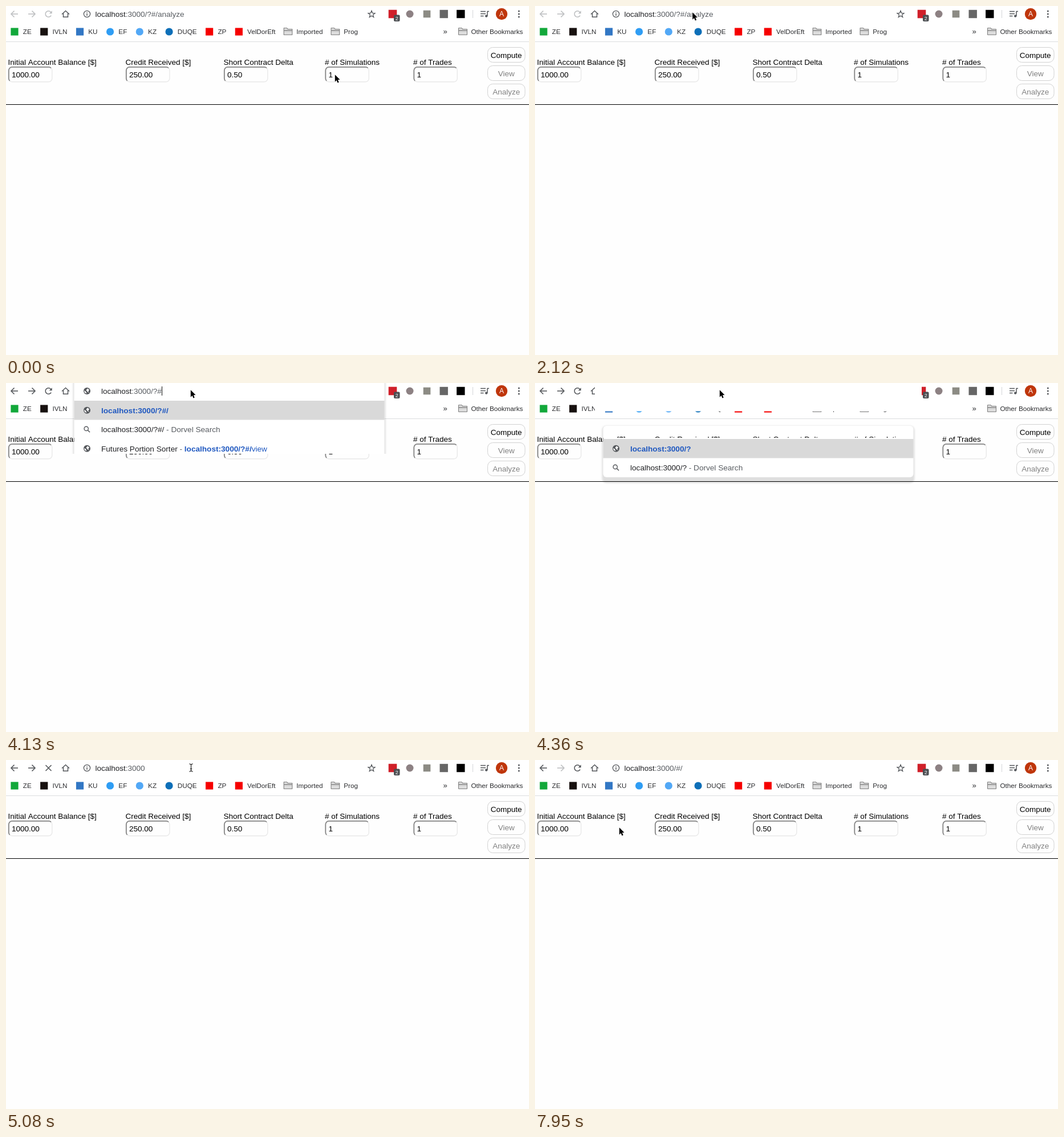
These frames come from a looping animation (917x611 px, 8 s). An HTML page with a canvas:

```html
<!DOCTYPE html>
<html lang="en">
<head>
<meta charset="utf-8">
<title>Position form</title>
<style>
html, body { margin: 0; width: 100%; height: 100%; overflow: hidden; background: #fefefe; }
canvas { display: block; }
</style>
</head>
<body>
<canvas id="stage" width="917" height="611"></canvas>
<script>
const ctx = document.getElementById('stage').getContext('2d');
const LOOP = 8000, STEP = 118;
const SANS = '"Liberation Sans", Arial, sans-serif';
const DARK = '#54575b', PALE = '#bdbfc1', INK = '#202124', GREY = '#595d62', BLUE = '#1f58c0';
const HOST = 'localhost:3000', PATH = '/?#/analyze';
const PAGES = ['/?#/view', PATH, '/#/view', '/#/', '/#/analyze', '/?#/'];
const ROW = 33.5, LEFT = 119.5, WIDTH = 544;

// Moments of the address bar session
const WAKE = 2350, SELECT = 2470, CARET = 2580, EDIT = 3060, SHRINK = 4130,
  SLIDE = 4360, SETTLE = 4470, ENTER = 4840, LOADED = 5200;

// Bursts of the delete key: start, presses, ms per press
const BURSTS = [[EDIT, 2, 115], [3540, 5, 90], [SHRINK, 4, 115]];

// Pointer strokes: start, end, from, bend, to
const STROKES = [
  [0, 830, [576, 119], [420, 296], [207, 113]],
  [830, 1310, [207, 113], [110, 10], [86, 10]],
  [1310, 1670, [86, 10], [150, 9], [254, 11]],
  [1670, SELECT, [254, 11], [270, 9], [323, 11]],
  [5080, 5560, [323, 11], [323, 200], [234, 343]],
  [5560, 5910, [234, 343], [236, 300], [240, 263]],
  [7590, 7950, [240, 263], [200, 170], [147, 117]]
];

const FIELDS = [
  [4, 'Initial Account Balance [$]', '1000.00'], [210, 'Credit Received [$]', '250.00'],
  [382, 'Short Contract Delta', '0.50'], [559.5, '# of Simulations', '1'], [714.5, '# of Trades', '1']
];

const BOOKMARKS = [
  ['ZE', square, '#12a83a'], ['IVLN', square, '#17110f'], ['KU', square, '#3277c4'],
  ['EF', disc, '#2f9df4'], ['KZ', disc, '#52a8f6'], ['DUQE', disc, '#0d6fb8'],
  ['ZP', square, '#f60000'], ['VelDorEft', square, '#f60000'],
  ['Imported', folder], ['Prog', folder]
];

function text(s, x, y, color = '#000', size = 13.5, weight = 400, align = 'left') {
  ctx.font = `${weight} ${size}px ${SANS}`;
  ctx.textAlign = align;
  ctx.fillStyle = color;
  ctx.fillText(s, x, y);
  return x + ctx.measureText(s).width;
}

function rect(x, y, w, h, color) {
  ctx.fillStyle = color;
  ctx.fillRect(x, y, w, h);
}

function square(x, y, r, color) {
  rect(x - r, y - r, 2 * r, 2 * r, color);
}

function disc(x, y, r, color) {
  ctx.beginPath();
  ctx.arc(x, y, r, 0, 7);
  ctx.fillStyle = color;
  ctx.fill();
}

function paint(fill, stroke, width) {
  if (stroke) {
    ctx.strokeStyle = stroke;
    ctx.lineWidth = width;
    ctx.stroke();
  }
  if (fill) {
    ctx.fillStyle = fill;
    ctx.fill();
  }
}

function trace(points, dx = 0, dy = 0) {
  ctx.beginPath();
  for (const [x, y] of points) ctx.lineTo(x + dx, y + dy);
}

function shape(points, dx, dy, fill, stroke, width) {
  trace(points, dx, dy);
  ctx.closePath();
  paint(fill, stroke, width);
}

function line(color, width, ...points) {
  trace(points);
  paint(null, color, width);
}

function box(x, y, w, h, r, fill, stroke, width) {
  ctx.beginPath();
  ctx.roundRect(x, y, w, h, r);
  paint(fill, stroke, width);
}

function ring(x, y, r, color, width, from = 0, to = 7) {
  ctx.beginPath();
  ctx.arc(x, y, r, from, to);
  paint(null, color, width);
}

function clipped(points, draw) {
  ctx.save();
  trace(points);
  ctx.clip();
  draw();
  ctx.restore();
}

const corners = (x, y, w, h) => [[x, y], [x + w, y], [x + w, y + h], [x, y + h]];

function arrow(x, dir, color) {
  line(color, 1.6, [x - 6 * dir, 14], [x + 6 * dir, 14]);
  line(color, 1.6, [x + .5 * dir, 8.5], [x + 6 * dir, 14], [x + .5 * dir, 19.5]);
}

function reload(color) {
  ring(74.5, 14, 5.3, color, 1.6, .5, 5.6);
  shape([[0, -5], [0, 0], [-5, 0]], 80.7, 13.2, color);
}

function globe(y) {
  disc(142, y, 6, DARK);
  shape([[-5, -1], [-2, 1], [-.5, 4.6], [-4, 3]], 142, y, '#fff');
  shape([[1, -4.5], [4, -2], [2, 1], [4, 3], [1.5, 2], [-1.5, -1.5]], 142, y, '#fff');
}

function lens(y) {
  ring(140.7, y - 1.3, 3.6, DARK, 1.4);
  line(DARK, 1.6, [143.3, y + 1.3], [147, y + 5]);
}

function folder(x, y) {
  const edge = '#5a5a5a';
  shape([[-7, -6], [-2, -6], [-.5, -4], [7, -4], [7, 5], [-7, 5]], x, y, '#dcdcdc', edge, 1.6);
  line(edge, 1, [x - 7, y - 2], [x + 7, y - 2]);
}

function star(x, y) {
  const tips = Array.from({ length: 10 }, (_, i) => {
    const a = (i / 5 - .5) * Math.PI, r = i % 2 ? 2.7 : 6.3;
    return [r * Math.cos(a), r * Math.sin(a)];
  });
  shape(tips, x, y, null, DARK, 1.3);
}

function toolbar(s) {
  arrow(15, -1, s.awake ? DARK : PALE);
  arrow(45, 1, s.awake && !s.loaded ? DARK : PALE);
  if (s.loading) for (const d of [-5, 5]) line(DARK, 1.6, [74.5 - d, 9], [74.5 + d, 19]);
  else reload(s.awake ? DARK : PALE);
  line(DARK, 1.5, [98, 14.5], [104.5, 8.5], [111, 14.5]);
  line(DARK, 1.5, [100.5, 13], [100.5, 19.3], [108.5, 19.3], [108.5, 13]);

  square(678, 14, 7.3, '#d0202a');
  box(680, 15.5, 10.5, 11.5, 2, '#4c4f53');
  text('2', 685.2, 24.7, '#fff', 9, 400, 'center');
  disc(708, 14, 6.5, '#8d8183');
  square(738, 14, 6.3, '#8c8b84');
  square(767.7, 14, 7.2, '#666');
  square(797.3, 14, 7.2, '#000');
  rect(818, 7, 1, 14, '#d5d6d8');
  for (const [i, w] of [9, 9, 5.5].entries()) rect(832, 8.8 + 4 * i, w, 1.5, DARK);
  line(DARK, 1.5, [844, 17.5], [844, 9.5], [847, 9.5]);
  disc(842.2, 17.6, 2.2, DARK);
  disc(869, 14, 10.2, '#bf360c');
  text('A', 869, 18.2, '#fff', 12, 400, 'center');
  for (const d of [-5, 0, 5]) disc(899.3, 14 + d, 1.5, DARK);
}

function bookmarks() {
  const ink = '#2a2b2e', size = 11.7;
  let x = 8;
  for (const [label, icon, color] of BOOKMARKS) {
    icon(x + 7, 45, 6.6, color);
    x = text(label, x + 21.8, 49, ink, size) + 15;
  }
  text('»', 766.5, 48.5, ink, 13);
  folder(801, 45);
  text('Other Bookmarks', 815.5, 49, ink, size);
}

function labels() {
  for (const [x, label] of FIELDS) text(label, x - .5, 103);
}

function field(x, value) {
  const y = 106.8, w = 76, h = 26, r = x + w, b = y + h;
  const frame = (color, width) => box(x, y, w, h, 6, null, color, width);
  frame('#e9e9e9', 1.4);
  clipped([[x - 2, b + 2], [x + 6, b - 6], [r - 6, y + 6], [r + 2, y - 2], [x - 2, y - 2]],
    () => frame('#858585', 1.8));
  text(value, x + 5.2, 125.3);
}

function page() {
  rect(0, 62, 917, 1, '#dcdddf');
  labels();
  for (const [x, , value] of FIELDS) field(x + .8, value);
  ['Compute', 'View', 'Analyze'].forEach((name, i) => {
    const y = 72.5 + i * 32;
    box(844.5, y, 65.5, 26, 9, null, '#d2d2d2', 1);
    text(name, 877.2, y + 18.2, i ? '#808080' : '#000', 13.5, 400, 'center');
  });
  rect(0, 172, 917, 1, '#000');
}

function address(s) {
  const x = s.editing ? 167 : 156.5, name = HOST.split(':')[0].length;
  if (s.focused) box(128, 1, 529, 26, 13, null, '#7baaf7', 2);
  if (s.editing) globe(14);
  else {
    ring(142, 14, 5.6, DARK, 1.3);
    rect(141.3, 13, 1.4, 4.2, DARK);
    rect(141.3, 10.6, 1.4, 1.5, DARK);
    star(641, 14.5);
  }
  if (s.selected) rect(x, 5, 156.5, 18, '#b3d7ff');
  const end = text(s.url.slice(name), text(s.url.slice(0, name), x, 18.8, INK), 18.8, GREY);
  if (s.caret) rect(Math.round(end), 6, 1, 16, '#111');
}

function panel(y, bottom) {
  ctx.save();
  ctx.filter = 'blur(1.5px)';
  box(LEFT - 2, y, WIDTH + 4, bottom - y + 10, 8, 'rgba(0,0,0,.12)');
  ctx.restore();
  box(LEFT, y, WIDTH, bottom - y, 6, '#fff');
}

function suggestions(query, pages, top) {
  const put = (s, x, y, color, weight) => text(s, x, y, color, 13.6, weight);
  const base = i => top + ROW * i + 21.5;
  rect(LEFT, top, WIDTH, ROW, '#d9d9d9');
  globe(base(0) - 4.8);
  put(query, 167, base(0), BLUE, 700);
  lens(base(1) - 4.8);
  put(' - Dorvel Search', put(query, 167, base(1), INK), base(1), GREY);
  pages.forEach((path, i) => {
    const y = base(i + 2);
    globe(y - 4.8);
    const x = put(' - ', put('Futures Portion Sorter', 167, y, INK), y, GREY);
    put((HOST + path).slice(query.length), put(query, x, y, BLUE, 700), y, BLUE);
  });
}

function popup(s) {
  const { path, pages } = s.popup;
  const top = s.sliding ? 98 : 31, bottom = top + ROW * (2 + pages.length);
  // The sliding list leaves its upper part see-through; the shrinking one is cut short
  clipped(corners(0, 0, 917, s.shrinking ? 124 : 611), () => {
    panel(s.sliding ? 75 : -8, bottom);
    if (s.sliding) clipped(corners(LEFT + 1, 75, WIDTH - 2, 21), labels);
    else address(s);
    suggestions(HOST + path, pages, top);
  });
}

function pointer([x, y], beam) {
  if (beam) {
    line('#222', 1.2, [324.5, 7.5], [324.5, 19.5]);
    for (const [edge, bend] of [[6.5, 8], [20.5, 19]])
      line('#222', 1.2, [321.5, edge], [324.5, bend], [327.5, edge]);
    line('#222', 1.2, [322.8, 15.5], [326.2, 15.5]);
    return;
  }
  shape([[0, 0], [0, 12.5], [2.8, 9.9], [4.7, 14.4], [6.9, 13.4], [5, 9], [8.7, 8.9]],
    x + .8, y + 1.2, '#000', '#fff', 1.8);
}

function pointerAt(t) {
  const [start, end, a, b, c] = STROKES.findLast(s => s[0] <= t);
  const held = Math.floor((t - start) / STEP) * STEP;
  const k = t >= end ? 1 : held / (end - start);
  return a.map((v, i) => v * (1 - k) ** 2 + 2 * b[i] * k * (1 - k) + c[i] * k * k);
}

function deletedAt(t) {
  return BURSTS.reduce((sum, [start, count, pace]) =>
    sum + Math.max(0, Math.min(count, Math.floor((t - start) / pace) + 1)), 0);
}

// The list answers one key press late until typing stops
function popupAt(t, deleted) {
  const path = t >= SETTLE ? '' : PATH.slice(0, PATH.length - deleted + 1);
  const match = PAGES.filter(p => p.startsWith(path));
  const pages = path === '' ? PAGES : path.endsWith('#') || path.endsWith('?') ? [] : match.slice(0, 1);
  return { path, pages };
}

function stateAt(t) {
  const within = (a, b) => t >= a && t < b;
  const deleted = deletedAt(t), editing = within(EDIT, ENTER);
  const path = t >= LOADED ? '/#/' : PATH.slice(0, PATH.length - deleted);
  return {
    url: HOST + path,
    editing,
    awake: t >= WAKE,
    loading: within(ENTER, LOADED),
    loaded: t >= LOADED,
    focused: within(SELECT, EDIT),
    selected: within(SELECT, CARET),
    caret: within(CARET, ENTER),
    shrinking: within(SHRINK, SHRINK + 115),
    sliding: within(SLIDE, SETTLE),
    popup: editing && deleted > 1 && popupAt(t, deleted)
  };
}

function draw(t) {
  const s = stateAt(t);
  rect(0, 0, 917, 611, '#fefefe');
  rect(0, 0, 917, 62, '#fff');
  toolbar(s);
  bookmarks();
  page();
  if (s.sliding) rect(105, 0, 573, 49.5, '#fff');
  else address(s);
  if (s.popup) popup(s);
  pointer(pointerAt(t), s.loading);
}

const start = performance.now();
function tick() {
  draw((performance.now() - start) % LOOP);
  requestAnimationFrame(tick);
}
tick();
</script>
</body>
</html>
```
